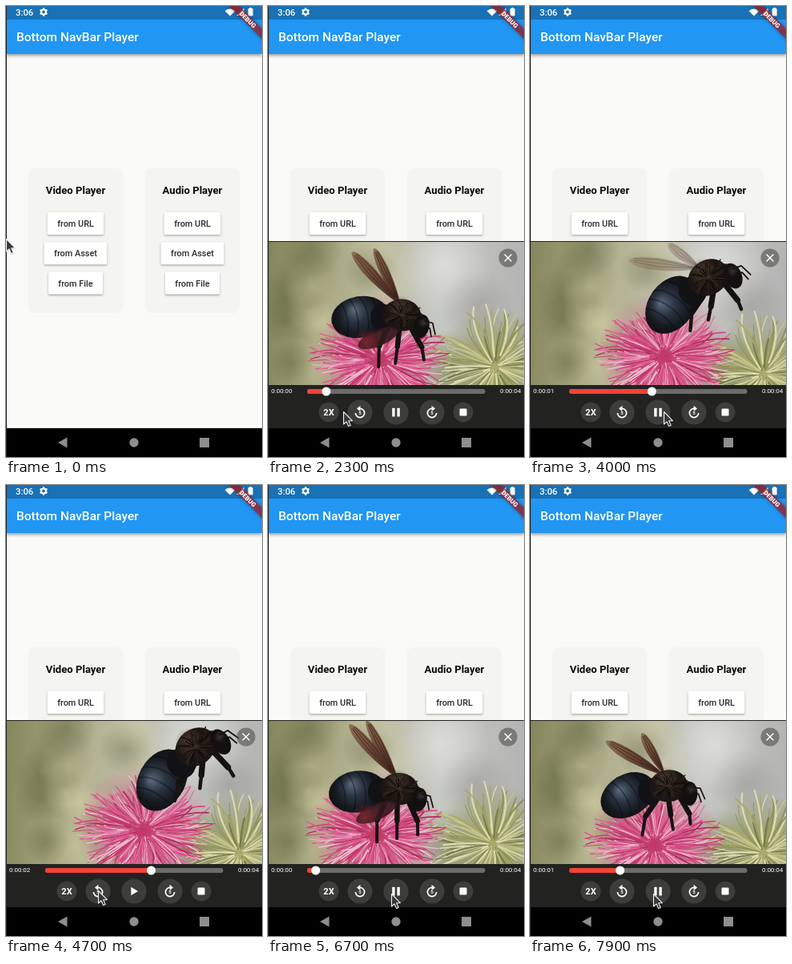
Recreate the animation shown at these times as an HTML page with a canvas. Size 320 by 564 pixels, loop 8000 ms.

```html
<!DOCTYPE html>
<html lang="en">
<head>
<meta charset="utf-8">
<title>Bottom NavBar Player</title>
<style>
  html, body { margin: 0; width: 100%; height: 100%; overflow: hidden; background: #000; }
  canvas { display: block; width: 100vw; height: 100vh; }
</style>
</head>
<body>
<canvas id="stage"></canvas>
<script>
const W = 320, H = 564, LOOP = 8;
const canvas = document.getElementById('stage');
const g = canvas.getContext('2d');
const TAU = Math.PI * 2;

// ---------- helpers ----------
const clamp = x => Math.max(0, Math.min(1, x));
const lerp = (a, b, k) => a + (b - a) * k;
const smooth = k => k * k * (3 - 2 * k);

function seeded(seed) {
  return () => {
    seed = (seed * 1664525 + 1013904223) >>> 0;
    return seed / 4294967296;
  };
}

function rect(x, y, w, h, color) {
  g.fillStyle = color;
  g.fillRect(x, y, w, h);
}

function round(x, y, w, h, r, color) {
  g.fillStyle = color;
  g.beginPath();
  g.roundRect(x, y, w, h, r);
  g.fill();
}

function oval(x, y, rx, ry, color, turn = 0) {
  g.fillStyle = color;
  g.beginPath();
  g.ellipse(x, y, rx, ry, turn, 0, TAU);
  g.fill();
}

const disc = (x, y, r, color) => oval(x, y, r, r, color);

function poly(points, color) {
  g.fillStyle = color;
  g.beginPath();
  points.forEach(([x, y]) => g.lineTo(x, y));
  g.closePath();
  g.fill();
}

function line(points, width, color) {
  g.strokeStyle = color;
  g.lineWidth = width;
  g.lineCap = g.lineJoin = 'round';
  g.beginPath();
  points.forEach(([x, y]) => g.lineTo(x, y));
  g.stroke();
}

function glow(x, y, r, rgb, alpha) {
  const fill = g.createRadialGradient(x, y, 0, x, y, r);
  fill.addColorStop(0, `rgba(${rgb},${alpha})`);
  fill.addColorStop(1, `rgba(${rgb},0)`);
  g.fillStyle = fill;
  g.fillRect(x - r, y - r, 2 * r, 2 * r);
}

function text(str, x, y, size, weight, color, align = 'left') {
  g.font = `${weight} ${size}px Roboto, sans-serif`;
  g.textAlign = align;
  g.fillStyle = color;
  g.fillText(str, x, y);
}

function shadow(color, blur, dy) {
  const scale = canvas.width / W;
  g.shadowColor = color;
  g.shadowBlur = blur * scale;
  g.shadowOffsetY = dy * scale;
}
const noShadow = () => shadow('transparent', 0, 0);

// Runs a drawing inside its own moved and turned frame.
function within(x, y, turn, paint) {
  g.save();
  g.translate(x, y);
  g.rotate(turn);
  paint();
  g.restore();
}

// ---------- timeline ----------
const PLAY = 1.75, PAUSE = 4.25, SEEK = 5.2, REPLAY = 6.4;

function videoTime(t) {
  if (t < PAUSE) return Math.max(0, t - PLAY);
  return t < SEEK ? PAUSE - PLAY : Math.max(0, t - REPLAY);
}

// The slider only moves on half-second ticks.
function sliderTime(t) {
  const tick = lead => Math.max(0, Math.floor((videoTime(t) - lead + 0.01) / 0.5) * 0.5 + lead);
  if (t < PAUSE) return tick(0.45);
  return t < SEEK ? PAUSE - PLAY : tick(0.2);
}

const moves = [
  { at: 0.05, time: 0.35, x: 76, y: 270 },
  { at: 0.95, time: 0.55, x: 94, y: 507 },
  { at: 2.6, time: 0.6, x: 167, y: 507 },
  { at: 4.25, time: 0.45, x: 115, y: 507 },
  { at: 5.7, time: 0.6, x: 154, y: 511 }
];

function cursorAt(t) {
  let x = 0, y = 291;
  for (const m of moves) {
    const k = smooth(clamp((t - m.at) / m.time));
    x = lerp(x, m.x, k);
    y = lerp(y, m.y, k);
  }
  return [x, y];
}

// ---------- app page ----------
function gear(x, y) {
  g.strokeStyle = '#fff';
  g.lineWidth = 2.2;
  g.beginPath();
  g.arc(x, y, 3, 0, TAU);
  g.stroke();
  for (let i = 0; i < 6; i++) {
    within(x, y, (i + 0.5) * TAU / 6, () => rect(3, -1.1, 2.2, 2.2, '#fff'));
  }
}

function appBar() {
  shadow('rgba(0,0,0,.4)', 4, 1.6);
  rect(0, 17, W, 43, '#2196f3');
  noShadow();
  rect(0, 0, W, 17, '#1971b6');
  text('3:06', 12, 12, 11.3, 500, '#fff');
  gear(47, 7.5);
  g.fillStyle = '#fff';
  g.beginPath();
  g.moveTo(280, 12.5);
  g.arc(280, 12.5, 9, -Math.PI * 0.75, -Math.PI * 0.25);
  g.fill();
  poly([[288, 12], [297.5, 12], [297.5, 2.5]], '#fff');
  round(302.6, 3, 6, 9.5, 1, '#fff');
  rect(304.3, 2, 2.6, 2, '#fff');
  text('Bottom NavBar Player', 13, 44, 15.5, 500, '#fff');
}

function debugRibbon() {
  within(W + 1, -1.6, Math.PI / 4, () => {
    shadow('rgba(0,0,0,.5)', 4, 0);
    rect(-36, 21.8, 72, 9.4, 'rgba(183,28,28,.63)');
    noShadow();
    text('DEBUG', 0, 29.3, 7.9, 900, '#fff', 'center');
  });
}

function card(x, title) {
  const mid = x + 59;
  round(x, 203, 118, 181, 8, '#f4f5f1');
  text(title, mid, 235, 13.1, 700, '#0a0a0a', 'center');
  ['URL', 'Asset', 'File'].forEach((name, i) => {
    const label = 'from ' + name, y = 258 + i * 37.3;
    g.font = '500 10.9px Roboto, sans-serif';
    const w = g.measureText(label).width + 25;
    shadow('rgba(0,0,0,.32)', 2.5, 1.3);
    round(mid - w / 2, y, w, 28, 1.6, '#fff');
    noShadow();
    text(label, mid, y + 18, 10.9, 500, '#2a2a2a', 'center');
  });
}

function navBar() {
  const gray = '#8e8e8e';
  rect(0, 528, W, 36, '#000');
  poly([[65, 546], [76.5, 539.5], [76.5, 552.5]], gray);
  disc(160, 546, 5.7, gray);
  rect(242, 540, 12, 12, gray);
}

// ---------- video picture ----------
function backdrop(v) {
  const base = g.createLinearGradient(0, 330, W, 360);
  ['#86875c', '#b3b291', '#c6c8c3', '#b3b4b3'].forEach((c, i) => base.addColorStop(i / 3, c));
  rect(0, 295, W, 180, base);

  // Soft foliage on the left, thinning out to gray on the right
  const rnd = seeded(12);
  for (let i = 0; i < 16; i++) {
    const x = rnd() * 150 + v * 11, y = 300 + rnd() * 170;
    glow(x, y, 22 + rnd() * 22, i % 2 ? '84,91,54' : '214,209,168', 0.42);
  }
  glow(215 + v * 11, 325, 60, '226,227,224', 0.75);
  glow(258 + v * 8, 375, 45, '140,138,130', 0.4);
  glow(225 + v * 8, 460, 55, '112,120,74', 0.6);
}

// A burst of fine bent strands around a centre.
function strands(x, y, count, reach, squash, seed, colors, width, inner = 0.3) {
  const rnd = seeded(seed);
  g.lineCap = 'round';
  for (let i = 0; i < count; i++) {
    const a = rnd() * TAU, bend = a + (rnd() - 0.5) * 0.5, r = reach * (0.55 + 0.45 * rnd());
    const at = (angle, k) => [x + Math.cos(angle) * r * k, y + Math.sin(angle) * r * k * squash];
    g.strokeStyle = colors[Math.floor(rnd() * colors.length)];
    g.lineWidth = width * (0.5 + rnd());
    g.beginPath();
    g.moveTo(...at(a, inner * (0.5 + rnd())));
    g.quadraticCurveTo(...at(a, 0.7), ...at(bend, 1));
    g.stroke();
  }
}

function thistle(v) {
  const k = clamp(v / 1.5), x = lerp(279, 292, k), y = lerp(446, 460, k);
  glow(x, y, 75, '140,147,80', 0.95);
  glow(x, y, 40, '176,178,112', 0.8);
  strands(x, y, 130, 88, 0.9, 41, ['#8e9458', '#c4c48c', '#dedbb2', '#a8a96a', '#757c4a'], 1.6, 0.15);
}

function flower(v) {
  const x = 130 + 17 * v, y = 429 + 22 * Math.sin(v * Math.PI / 2.6);
  glow(x, y, 85, '206,72,122', 0.85);
  glow(x, y, 60, '190,48,96', 0.85);
  strands(x, y, 300, 90, 0.8, 7, ['#cf3a76', '#dc5f93', '#e892b5', '#b32c5c', '#efbdd0', '#d64a84'], 1.2);
}

function wing(x, y, angle, len, width) {
  within(x, y, angle, () => {
    const fill = g.createLinearGradient(0, 0, len, 0);
    ['#2c1712', '#5f382b', '#87684f'].forEach((c, i) => fill.addColorStop(i / 2, c));
    g.fillStyle = fill;
    g.beginPath();
    g.moveTo(0, 0);
    g.bezierCurveTo(len * 0.3, -width * 0.6, len * 0.85, -width, len, -width * 0.15);
    g.bezierCurveTo(len, width * 0.5, len * 0.5, width * 0.7, 0, 0);
    g.fill();
    for (let i = -1; i < 2; i++) {
      line([[2, 0], [len * 0.6, width * 0.3 * i], [len * 0.93, width * 0.15 * i]], 0.8, '#3a1c14');
    }
  });
}

function wings(v) {
  const spread = 0.1 + 0.17 * smooth(clamp(v / 1.5));
  g.globalAlpha = 0.9 * clamp((2.45 - v) / 0.6);
  wing(50, -18, -2.2 - spread, 92 - 4 * v, 13);
  wing(50, -18, -2.2 + spread, 88 - 18 * v, 11);
  g.globalAlpha = 1;
}

// Legs hang straight down whatever the body does.
function legs(v, turn) {
  for (let i = 0; i < 3; i++) {
    const sway = 6 * Math.sin(v * 4 + i * 2), reach = 1 - 0.12 * v;
    const knee = [(i - 1) * 14 + sway / 2, 26 * reach], foot = [(i - 1) * 17 + sway, 54 * reach - i * 5];
    within(36 + 14 * i, 10, -turn, () => {
      line([[0, 0], knee], 6.5, '#14110f');
      line([knee, foot], 4, '#191312');
    });
  }
}

function belly(tilt) {
  within(0, 0, tilt, () => {
    const rx = 36, ry = 26;
    const shell = g.createRadialGradient(-6, -11, 1, 0, 0, rx);
    ['#596779', '#2b3442', '#171a20', '#0f1013'].forEach((c, i) => shell.addColorStop(i / 3, c));
    oval(0, 0, rx, ry, shell);
    g.clip();
    for (let i = 0; i < 4; i++) {
      g.strokeStyle = 'rgba(4,5,8,.4)';
      g.lineWidth = 1.6;
      g.beginPath();
      g.ellipse(i * 13 - 27, 0, 11, ry, 0, -Math.PI / 2, Math.PI / 2);
      g.stroke();
    }
  });
}

function chestAndHead() {
  oval(28, -1, 15, 17, '#121216');
  oval(52, -5, 24, 20, '#1b1513');
  glow(50, -13, 17, '104,80,64', 0.75);
  strands(52, -5, 70, 26, 0.8, 19, ['#120e0c', '#33261f', '#1f1714'], 1);
  oval(77, 8, 10, 15, '#131011', 0.15);
  glow(80, 3, 7, '70,66,64', 0.7);
  for (let i = 0; i < 2; i++) {
    line([[81, 1 + i * 6], [91 - i * 3, 3 + i * 7], [95 - i * 5, 17 + i * 3]], 1.7, '#17120f');
  }
}

// Belly centre and body turn at a few moments of the clip.
const flight = [
  { at: 0, x: 108, y: 377, turn: 0 },
  { at: 0.55, x: 115, y: 389, turn: 0.05 },
  { at: 1.5, x: 122, y: 388, turn: -0.13 },
  { at: 2.5, x: 195, y: 369, turn: -0.68 }
];

function bee(v) {
  const i = Math.max(1, flight.findIndex(p => p.at >= v));
  const a = flight[i - 1], b = flight[i], k = clamp((v - a.at) / (b.at - a.at));
  const turn = lerp(a.turn, b.turn, k), size = 1 + 0.13 * clamp(v - 1.5);
  within(lerp(a.x, b.x, k), lerp(a.y, b.y, k), turn, () => {
    g.scale(size, size);
    wings(v);
    belly(-0.15 - 0.25 * smooth(clamp(v / 1.5)));
    legs(v, turn);
    chestAndHead();
    // Folded lower wing
    g.globalAlpha = clamp((1.3 - v) / 0.6) * 0.9;
    oval(24, 25, 27, 10, '#33191c', -0.45);
    glow(10, 30, 17, '140,40,52', 0.75);
    g.globalAlpha = 1;
  });
}

function video(v) {
  g.save();
  g.beginPath();
  g.rect(0, 295, W, 179);
  g.clip();
  [backdrop, thistle, flower, bee].forEach(paint => paint(v));
  g.restore();
}

// ---------- player ----------
function skipIcon(x, dir) {
  g.save();
  g.translate(x, 509);
  g.scale(dir, 1);
  g.strokeStyle = '#fff';
  g.lineWidth = 1.7;
  g.lineCap = 'butt';
  g.beginPath();
  g.arc(0, 0, 5.6, -Math.PI / 2, Math.PI);
  g.stroke();
  poly([[0.4, -9.2], [0.4, -2], [-4, -5.6]], '#fff');
  g.restore();
  text('5', x, 511.2, 6, 700, '#fff', 'center');
}

function controls(t) {
  rect(0, 474, W, 54, '#222221');
  const pos = sliderTime(t), x = 49 + pos * 53;
  round(49, 479, 222.5, 6, 3, '#6c6c6b');
  round(49, 479, x - 49, 6, 3, '#f44336');
  disc(x, 482, 5.5, '#fff');
  text('0:00:0' + Math.floor(pos), 4, 484, 8, 400, '#fff');
  text('0:00:04', 316.3, 484, 8, 400, '#fff', 'right');

  for (const cx of [76, 115, 160, 205, 244]) {
    disc(cx, 508, Math.abs(cx - 160) > 50 ? 12.5 : 15.6, '#3d3d3c');
  }
  text('2X', 76, 512, 11, 700, '#fff', 'center');
  skipIcon(115, 1);
  skipIcon(205, -1);
  round(239.5, 503.5, 9, 9, 1.2, '#fff');
  if (t >= PAUSE && t < REPLAY) {
    poly([[156.3, 502.7], [156.3, 513.3], [165, 508]], '#fff');
  } else {
    for (const bar of [155.2, 161.4]) round(bar, 502.7, 3.4, 10.8, 0.6, '#fff');
  }
}

function closeButton() {
  disc(300, 315, 11.6, 'rgba(84,83,80,.62)');
  for (const s of [-4, 4]) line([[300 - s, 311], [300 + s, 319]], 1.5, '#fff');
}

function player(t) {
  if (t < 1) return;
  const open = 1 - (1 - clamp((t - 1) / 0.25)) ** 3;
  g.save();
  g.beginPath();
  g.rect(0, 0, W, 528);
  g.clip();
  g.translate(0, (1 - open) * 234);
  rect(0, 294, W, 234, '#222221');
  video(videoTime(t));
  closeButton();
  controls(t);
  g.restore();
}

function cursor(t) {
  const shape = [[0.5, 0.5], [0.5, 16], [4, 12.8], [6.6, 18.6], [9.2, 17.4], [6.7, 11.8], [11.4, 11.6]];
  within(...cursorAt(t), 0, () => {
    shadow('rgba(0,0,0,.35)', 2, 1);
    poly(shape, '#383838');
    noShadow();
    line([...shape, shape[0]], 1.1, '#f2f2f2');
  });
}

function draw(t) {
  rect(0, 0, W, H, '#fafaf8');
  rect(0, 524, W, 4, '#fff');
  card(28, 'Video Player');
  card(174, 'Audio Player');
  appBar();
  player(t);
  navBar();
  debugRibbon();
  rect(0, 0, 1, H, '#262626');
  cursor(t);
}

function resize() {
  const ratio = window.devicePixelRatio || 1;
  canvas.width = Math.round(innerWidth * ratio);
  canvas.height = Math.round(innerHeight * ratio);
}
addEventListener('resize', resize);
resize();

const begin = performance.now();
function frame() {
  g.setTransform(canvas.width / W, 0, 0, canvas.height / H, 0, 0);
  draw(((performance.now() - begin) / 1000) % LOOP);
  requestAnimationFrame(frame);
}
frame();
</script>
</body>
</html>
```
